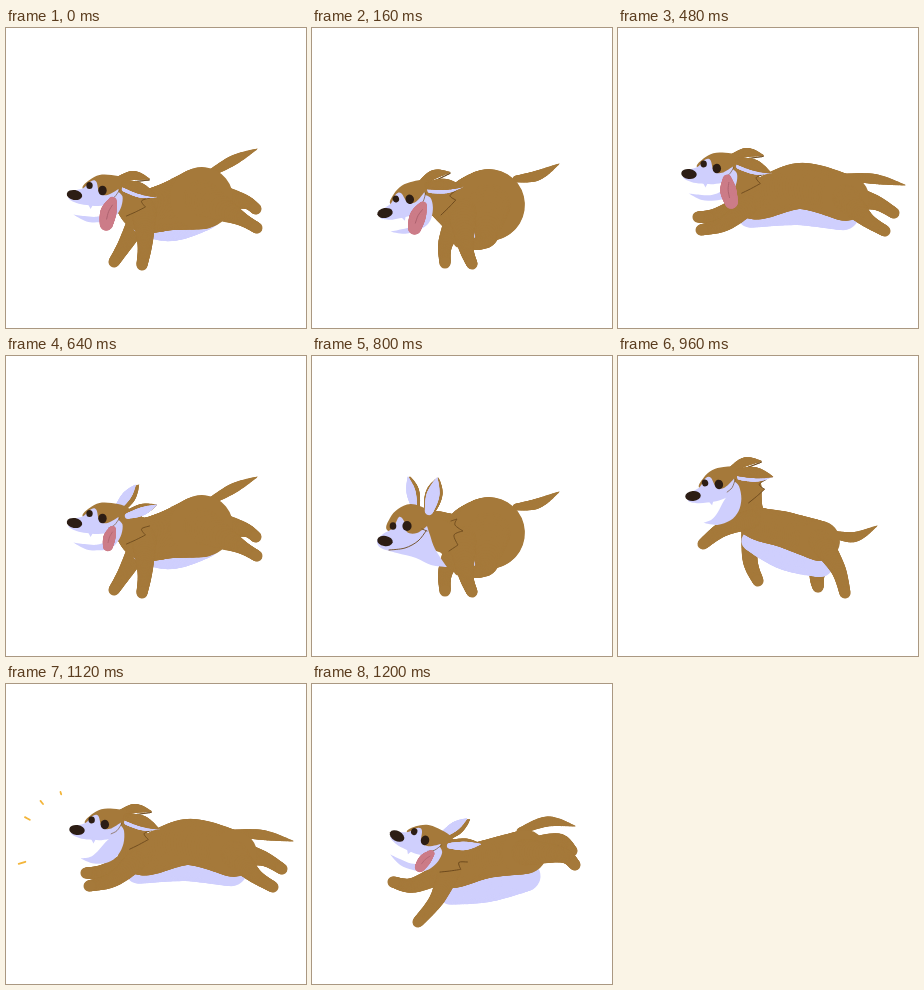
An HTML page that plays this animation: 300x300 px, repeating every 1280 ms.

```html
<!DOCTYPE html>
<html lang="en">
<head>
<meta charset="utf-8">
<title>Running dog</title>
<style>
html, body { margin: 0; width: 100%; height: 100%; overflow: hidden; background: #fff; }
svg { display: block; width: 100vw; height: 100vh; }
</style>
</head>
<body>
<svg id="stage" viewBox="0 0 300 300"></svg>
<script>
const STEP = 80, STEPS = 16;
const FUR = '#a5793a', PALE = '#cfcffd', DARK = '#2c1d14', LINE = '#6d4a1e',
      PINK = '#cc7c88', RAY = '#f3b53a';

const lerp = (a, b, t) => a + (b - a) * t;
const add = ([x, y], [dx, dy]) => [x + dx, y + dy];
const group = (transform, inner) => `<g transform="${transform}">${inner}</g>`;
const oval = (x, y, rx, ry, turn = 0, fill = DARK) =>
  `<ellipse rx="${rx}" ry="${ry}" fill="${fill}" transform="translate(${x} ${y}) rotate(${turn})"/>`;

// Catmull-Rom value between b and c.
const spline = (a, b, c, d, t) =>
  b + t * ((c - a) + t * (2 * a - 5 * b + 4 * c - d + t * (3 * (b - c) + d - a))) / 2;

// A rounded limb of changing thickness along [x, y, radius] joints.
function tube(color, ...joints) {
  const n = joints.length - 1, parts = 18;
  const at = i => joints[Math.max(0, Math.min(n, i))];
  const sample = s => {
    const i = Math.min(n - 1, Math.floor(s));
    return [0, 1, 2].map(k => spline(at(i - 1)[k], at(i)[k], at(i + 1)[k], at(i + 2)[k], s - i));
  };
  let out = '', p = sample(0);
  for (let j = 1; j <= n * parts; j++) {
    const q = sample(j / parts);
    out += `<path d="M${p[0].toFixed(1)} ${p[1].toFixed(1)}L${q[0].toFixed(1)} ${q[1].toFixed(1)}" ` +
           `stroke-width="${Math.max(0.3, p[2] + q[2]).toFixed(2)}"/>`;
    p = q;
  }
  return `<g stroke="${color}" stroke-linecap="round">${out}</g>`;
}

// Pointed shape from base to tip, its middle lifted by bend.
function leaf(color, base, tip, r, bend = 0) {
  const mid = [lerp(base[0], tip[0], 0.5), lerp(base[1], tip[1], 0.5) + bend];
  return tube(color, [...base, r * 0.65], [...mid, r], [...tip, 0.4]);
}

// Smooth curve through "x,y" points; "!" marks a sharp corner.
function curve(text, closed) {
  const pts = text.split(' ').map(s => {
    const [x, y] = s.replace('!', '').split(',').map(Number);
    return { x, y, k: s.endsWith('!') ? 0 : 1 / 6 };
  });
  const n = pts.length;
  const at = i => closed ? pts[(i + n) % n] : pts[Math.max(0, Math.min(n - 1, i))];
  let d = `M${pts[0].x} ${pts[0].y}`;
  for (let i = 0; i < (closed ? n : n - 1); i++) {
    const [a, b, c, e] = [-1, 0, 1, 2].map(k => at(i + k));
    d += `C${b.x + (c.x - a.x) * b.k} ${b.y + (c.y - a.y) * b.k} ` +
         `${c.x - (e.x - b.x) * c.k} ${c.y - (e.y - b.y) * c.k} ${c.x} ${c.y}`;
  }
  return d;
}
const shape = (fill, pts) => `<path d="${curve(pts, true)}" fill="${fill}"/>`;
const line = (pts, color = LINE, w = 0.9) =>
  `<path d="${curve(pts, false)}" fill="none" stroke="${color}" stroke-width="${w}" stroke-linecap="round"/>`;

// Key poses: spine circles run chest to rump, legs are [knee, foot],
// tail is [base, tip], head is nose x, y and turn.
const push = {
  spine: [[138, 183, 21], [165, 178, 24], [196, 170, 31]], belly: [0, 11],
  foreNear: [[139, 215], [136, 237]], foreFar: [[120, 215], [108, 234]],
  hindNear: [[232, 189], [251, 200]], hindFar: [[236, 173], [250, 181]],
  tail: [[203, 146], [251, 121]], bend: -1, head: [68.5, 167, 0], tongue: 15
};
const gather = {
  spine: [[150, 183, 24], [163, 179, 31], [177, 177, 36]], belly: [0, 0],
  foreNear: [[154, 219], [160, 236]], foreFar: [[134, 214], [133, 235]],
  hindNear: [[171, 213], [147, 214]], hindFar: [[175, 212], [152, 212]],
  tail: [[204, 151], [247, 136]], bend: 4, head: [73, 185, -20], tongue: 20
};
const rise = {
  spine: [[133, 163, 16], [168, 174, 18], [202, 185, 20]], belly: [0, 22],
  foreNear: [[105, 173], [85, 188]], foreFar: [[132, 203], [140, 225]],
  hindNear: [[220, 213], [227, 237]], hindFar: [[199, 219], [200, 231]],
  tail: [[214, 178], [259, 170]], bend: 7, head: [75, 140, -15], tongue: 17
};
const leap = {
  spine: [[115, 157, 18], [165, 164, 23], [210, 182, 25]], belly: [-4, 13],
  foreNear: [[83, 171], [63, 178]], foreFar: [[94, 182], [85, 198]],
  hindNear: [[242, 210], [260, 234]], hindFar: [[250, 202], [271, 216]],
  tail: [[222, 161], [268, 178]], bend: -1, head: [62, 119, 10], tongue: 5
};
const stretch = {
  spine: [[135, 172, 19], [182, 158, 23], [228, 170, 23]], belly: [-3, 16],
  foreNear: [[108, 195], [83, 202]], foreFar: [[100, 187], [80, 189]],
  hindNear: [[248, 191], [267, 203]], hindFar: [[256, 174], [276, 185]],
  tail: [[226, 149], [287, 157]], bend: -2, head: [71, 146, -2], tongue: -10
};
const reach = {
  spine: [[138, 185, 19], [175, 175, 19], [213, 168, 22]], belly: [0, 24],
  foreNear: [[125, 215], [106, 238]], foreFar: [[102, 201], [81, 198]],
  hindNear: [[250, 171], [263, 181]], hindFar: [[246, 157], [260, 167]],
  tail: [[208, 147], [263, 142]], bend: -7, head: [85, 152, 18], tongue: 40
};

const halfway = (a, b) => Array.isArray(a)
  ? a.map((v, i) => halfway(v, b[i])) : lerp(a, b, 0.5);
const between = (a, b) =>
  Object.fromEntries(Object.keys(a).map(k => [k, halfway(a[k], b[k])]));
const strides = [push, between(push, gather), gather, between(gather, rise),
                 rise, leap, stretch, reach];

function leg(root, [knee, foot]) {
  return tube(FUR, [root[0], root[1], root[2] * 0.6], [...knee, 7.5], [...foot, 5.5]);
}

function body(p) {
  const [chest, mid, rump] = p.spine;
  const under = (c, size) => [...add(c, p.belly), c[2] * size];
  const [x, y, turn] = p.head, a = turn * Math.PI / 180;
  const nape = [x + 54 * Math.cos(a) - 4 * Math.sin(a), y + 54 * Math.sin(a) + 4 * Math.cos(a), 15];
  const folded = p === gather;
  return leaf(FUR, ...p.tail, 5, p.bend) +
    leg(rump, p.hindFar) + leg(chest, p.foreFar) +
    tube(PALE, under(chest, 0.6), under(mid, 1), under(rump, 0.7)) +
    tube(FUR, nape, chest, mid, rump) +
    (folded ? oval(158, 203, 11, 8, -20, PALE) : '') +
    leg(rump, p.hindNear) + leg(chest, p.foreNear);
}

// Heads are drawn around the nose. Ears: base, tip, radius, bend, offset of the pale inside.
const ears = {
  back: { far: [[43, -15], [75, -16], 4.5, -4], near: [[50, -11], [82, 2], 5.5, -2, [0, 5]] },
  up: { far: [[46, -14], [64, -38], 6, 0, [-3, -1]], near: [[53, -9], [82, -18], 5.5, 0, [0, 2]] },
  tall: { far: [[31, -36], [25, -64], 6, 0, [-2, 1]], near: [[45, -31], [53, -63], 8.5, 0, [-1, 1]] }
};
function ear([base, tip, r, bend, inside]) {
  const outer = leaf(FUR, base, tip, r, bend);
  if (!inside) return outer + leaf(LINE, add(base, [2, 2]), add(tip, [0, 1]), 0.5, bend + r);
  const low = inside[1] > r / 2;
  const inner = leaf(PALE, add(base, inside), add(tip, [inside[0], 0]), r * 0.75, bend + inside[1] / 2);
  return low ? inner + outer : outer + inner;
}

function openHead(barking, style, tongueTurn) {
  const jaw = barking
    ? '44,-3! 47,3 46,16 40,28 30,35 16,36 3,30! 12,29 20,23 28,14 36,6'
    : '44,-4! 48,2 47,14 42,26 35,33 25,35 12,34 -1,25! 10,27 22,28 32,23 38,12';
  const size = style === 'up' ? 0.75 : 1;
  return ear(ears[style].far) +
    shape(FUR, '8,-7 15,-15 25,-20 37,-20 50,-17 62,-9 75,3! 67,6 71,12! 61,17 50,22 42,12 40,2 30,4 18,0') +
    line('75,3 67,6 71,12! 61,17 52,21') +
    group(`scale(1 ${barking ? 0.95 : 0.78})`,
      shape('#fff', '6,4! 30,6 43,-2! 43,14 35,27 20,29 6,26!') + shape(PALE, jaw)) +
    shape(PALE, '-6,3 0,-4 9,-7 17,-14 22,-13 25,-2 33,0 44,-6! 43,2 35,9 24,11 12,10 2,8') +
    shape(PALE, '13,8! 16,14! 19,9!') + line('34,5 40,2 45,-5', LINE, 0.6) +
    (barking ? '' : group(`translate(38 6) rotate(${tongueTurn}) scale(${size})`,
      tube(PINK, [0, 0, 4], [-1, 12, 8], [0, 24, 6.5]) + line('1,4 -1,11 -1,19', '#a95f6c', 0.8))) +
    oval(15, -9.5, 3.2, 3.5) + oval(28, -4.5, 4.2, 4.8) + oval(0, 0, 7.8, 5, 10) +
    ear(ears[style].near);
}

function closedHead() {
  return ear(ears.tall.far) +
    shape(FUR, '2,-11 5,-23 13,-32 26,-37 44,-31 60,-20 79,-12! 70,-8 73,2! 63,12 46,8 20,-5') +
    line('66,-20 72,-22! 70,-16 78,-10! 69,-6 73,4! 64,10') +
    shape(PALE, '-8,0 -2,-7 8,-13 14,-24 19,-20 22,-9 32,-8 42,-15! 45,-6 50,8 62,26! 46,24 31,17 12,12 -4,7') +
    line('4,9 20,7 33,0 41,-10') + line('37,-12 42,-10') +
    oval(8, -15, 3.3, 3.8) + oval(22, -15, 4.6, 5) + oval(0, 0, 7.8, 5.2, 10) +
    ear(ears.tall.near);
}

function head(p, i) {
  const [x, y, turn] = p.head;
  const shut = i >= 9 && i <= 11, barking = i >= 12 && i <= 14;
  const style = i === 8 || i === 15 ? 'up' : 'back';
  const art = shut ? group('rotate(20)', closedHead()) : openHead(barking, style, p.tongue - turn);
  return group(`translate(${x} ${y}) rotate(${turn})`, art);
}

// Bark lines fly outwards and shorten.
function rays(p, i) {
  const age = i - 13;
  if (age !== 0 && age !== 1) return '';
  return [163, 209, 231, 253].map((deg, k) => {
    const r = 34 + 20 * age, length = (14 - 3 * k) * (1 - age / 2);
    const at = d => `${p.head[0] + d * Math.cos(deg * Math.PI / 180)},${p.head[1] + 16 + d * Math.sin(deg * Math.PI / 180)}`;
    return line(`${at(r)} ${at(r + length)}`, RAY, 1.8);
  }).join('');
}

const scenes = Array.from({ length: STEPS }, (_, i) => {
  const p = strides[i % strides.length];
  return body(p) + head(p, i) + rays(p, i);
});

const stage = document.getElementById('stage');
let shown = -1;
function draw(ms) {
  const i = Math.floor(ms / STEP) % STEPS;
  if (i !== shown) stage.innerHTML = scenes[shown = i];
}
const start = performance.now();
function tick() {
  draw(performance.now() - start);
  requestAnimationFrame(tick);
}
tick();
</script>
</body>
</html>
```
